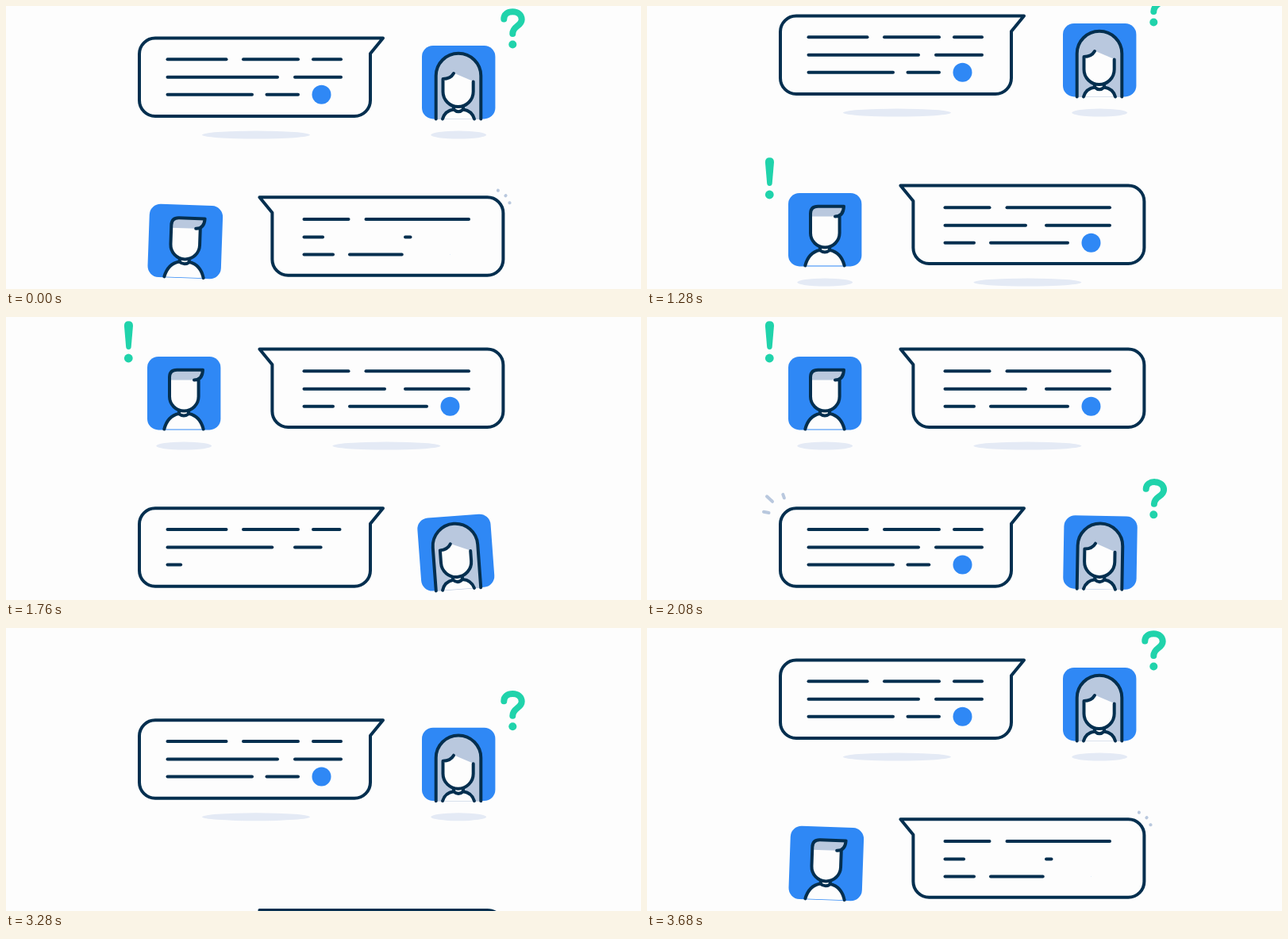
These frames come from a looping animation (800x357 px, 3.72 s). An HTML page with a canvas:

```html
<!DOCTYPE html>
<html lang="en">
<head>
<meta charset="utf-8">
<title>Question and answer</title>
<style>
  html, body { margin: 0; width: 100%; height: 100%; overflow: hidden; background: #fdfdfd; }
  canvas { display: block; }
</style>
</head>
<body>
<canvas id="stage" width="800" height="357"></canvas>
<script>
const ctx = document.getElementById('stage').getContext('2d');
const NAVY = '#042f4f', BLUE = '#2f88f5', GREEN = '#20d3ab', GREY = '#b9c8de', PALE = '#e4eaf5', WHITE = '#fdfdfd';
const LOOP = 3720, CYCLE = 3680, FRAME = 40, ENTER = -130;

const clamp = v => Math.max(0, Math.min(1, v));
const smooth = v => { v = clamp(v); return v * v * (3 - 2 * v); };

// Monotone cubic curve through [time, value] points.
function track(points, t) {
  const last = points.length - 1;
  if (t <= points[0][0]) return points[0][1];
  if (t >= points[last][0]) return points[last][1];
  const slope = i => (points[i + 1][1] - points[i][1]) / (points[i + 1][0] - points[i][0]);
  const tangent = i => {
    if (i === 0 || i === last) return slope(Math.min(i, last - 1));
    const a = slope(i - 1), b = slope(i);
    return a * b > 0 ? 2 * a * b / (a + b) : 0;
  };
  let i = 0;
  while (points[i + 1][0] < t) i++;
  const h = points[i + 1][0] - points[i][0], u = (t - points[i][0]) / h, s = smooth(u);
  return points[i][1] * (1 - s) + points[i + 1][1] * s
    + h * u * (1 - u) * (tangent(i) * (1 - u) - tangent(i + 1) * u);
}

// Motion of a speech group, in ms since its arrival in the lower row.
const HEIGHT = [[ENTER, 331], [-80, 255], [-40, 212], [0, 201.6], [50, 199.6], [160, 200.8],
  [1480, 200.8], [1560, 186], [1720, 75.7], [1840, -2], [1890, -3.5], [2000, 0],
  [3320, 0], [3400, -28], [3550, -225]];
const LEAN = [[ENTER, 0], [0, -4], [100, -6], [280, -2], [440, 1.4], [520, 1], [660, 0]];
const POP = [[300, 0], [440, 1.06], [520, 1]];
const WAG = [[300, -20], [450, 5], [520, 2.5], [680, -2], [830, 1], [980, 0]];

const BUBBLE = new Path2D('M188 40.5H475L459 60V119a20 20 0 0 1-20 20H188a20 20 0 0 1-20-20V60.5a20 20 0 0 1 20-20z');
const RAYS = [[174.5, 32, 171.3, 23], [165, 38.5, 151, 25.5], [160, 47.5, 147, 45]];

function fill(path, color) { ctx.fillStyle = color; ctx.fill(new Path2D(path)); }
function stroke(path, color = NAVY, width = 4) {
  ctx.strokeStyle = color;
  ctx.lineWidth = width;
  ctx.stroke(new Path2D(path));
}
function ellipse(x, y, rx, ry, color) {
  ctx.fillStyle = color;
  ctx.beginPath();
  ctx.ellipse(x, y, rx, ry, 0, 0, 7);
  ctx.fill();
}
function line(x1, y1, x2, y2, color) { stroke(`M${x1} ${y1}L${x2} ${y2}`, color); }

function within(draw) { ctx.save(); draw(); ctx.restore(); }
function pivot(x, y, degrees, scale = 1) {
  ctx.translate(x, y);
  ctx.rotate(degrees * Math.PI / 180);
  ctx.scale(scale, scale);
  ctx.translate(-x, -y);
}

function woman() {
  fill('M541.7 143V88a28.3 28.3 0 0 1 56.6 0V143z', GREY);
  const body = 'M550 142.5C552 135.5 557 131.5 564 130.5Q570 136 576 130.5C583 131.5 588 135.5 590 142.5';
  fill(body, WHITE);
  fill('M564 124V130Q570 136 576 130V124z', WHITE);
  fill('M550.5 92V108a19.1 19.1 0 0 0 38.2 0V95L564 84.5Q559 92 550.5 92z', WHITE);
  stroke('M541.7 142.5V88a28.3 28.3 0 0 1 56.6 0V142.5');
  stroke(body);
  stroke('M564 127V130.5M576 127V130.5');
  stroke('M564 85Q560 92 550.5 92V108a19.1 19.1 0 0 0 38.2 0V95.5');
}

function man() {
  const body = 'M199.3 141.5C202 131 208 124 217.5 122Q224 127 230.5 122C240 124 246 131 248.7 141.5';
  fill(body, WHITE);
  fill('M218 116V122Q224 127 230 122V116z', WHITE);
  fill('M206 78V100.3a18.3 18.3 0 0 0 36.6 0V78z', WHITE);
  fill('M206 79.5V76Q206 66.7 215.5 66.7H248Q247.500 79.500 237 79.500z', GREY);
  stroke(body);
  stroke('M218 118.5V122M230 118.5V122');
  stroke('M237 79.500Q247.500 79.500 248 66.7H215.5Q206 66.7 206 76V100.3a18.3 18.3 0 0 0 36.6 0V79');
}

function questionMark() {
  stroke('M627.3 16.500C627.300 10.500 632 7.300 638.300 7.300C645 7.300 649.700 11.300 649.700 17C649.700 25.500 638.300 25 638.300 35', GREEN, 8);
  ellipse(638.3, 48.5, 5, 5, GREEN);
}

function exclamationMark() {
  fill('M148.9 11Q148.900 5.300 154.400 5.300Q160 5.300 160 11L157.700 38Q157.300 41 154.400 41Q151.600 41 151.200 38z', GREEN);
  ellipse(154.3, 52, 5.4, 5.4, GREEN);
}

// Text strokes: [x1, x2, row, start time].
const ROWS = [67.2, 89.7, 111.7];
const groups = [
  {
    arrival: 1560, side: 1, textShift: 0, person: woman, mark: questionMark, markAt: [638.3, 48.5],
    text: [[203.5, 277.5, 0, -102], [299, 368, 0, -58], [387, 422, 0, -10], [203.5, 342, 1, -8],
      [364, 422, 1, 70], [203.5, 310, 2, 140], [328.5, 368, 2, 371]],
    dot: [397.5, 270]
  },
  {
    arrival: 3400, side: -1, textShift: 1, person: man, mark: exclamationMark, markAt: [154.3, 52],
    text: [[375.5, 431.5, 0, -102], [453.5, 583, 0, -58], [375.5, 477, 1, 205], [503, 583, 1, 238],
      [375.5, 412, 2, 0], [433, 530, 2, 131]],
    dot: [559.5, 265]
  }
];

function drawGroup(g, time) {
  const c = (time - g.arrival - ENTER + 2 * CYCLE) % CYCLE + ENTER;
  const lean = track(LEAN, c) * g.side;
  const centre = g.side > 0 ? 570.2 : 224.2;
  ctx.translate(0, track(HEIGHT, c));

  within(() => {
    if (g.side < 0) { ctx.translate(794.4, 0); ctx.scale(-1, 1); }
    ellipse(315, 162.6, 68, 5, PALE);
    ellipse(570.2, 162.6, 35, 5, PALE);
    ctx.strokeStyle = NAVY;
    ctx.lineWidth = 4;
    ctx.stroke(BUBBLE);
    const head = smooth((c - 265) / 210), tail = smooth((c - 400) / 240);
    if (head > 0 && tail < 1) {
      for (const [x, y, dx, dy] of RAYS.map(r => [r[0], r[1], r[2] - r[0], r[3] - r[1]])) {
        line(x + dx * tail, y + dy * tail, x + dx * head, y + dy * head, GREY);
      }
    }
  });

  for (const [x1, x2, row, start] of g.text) {
    const grown = smooth((c - start) / 240), y = ROWS[row] + g.textShift;
    if (grown > 0) line(x1, y, x1 + (x2 - x1) * grown, y, NAVY);
  }
  const radius = 12 * smooth((c - g.dot[1]) / 200);
  ellipse(g.dot[0], ROWS[2] + g.textShift, radius, radius, BLUE);

  within(() => {
    pivot(centre, 142.3, lean);
    ctx.fillStyle = BLUE;
    ctx.beginPath();
    ctx.roundRect(centre - 46.2, 50, 92.4, 92.4, 14);
    ctx.fill();
    g.person();
  });

  const pop = track(POP, c);
  if (pop > 0) within(() => {
    pivot(...g.markAt, track(WAG, c) * g.side, pop);
    g.mark();
  });
}

function render(now) {
  const time = Math.floor(now % LOOP / FRAME) * FRAME;
  ctx.fillStyle = WHITE;
  ctx.fillRect(0, 0, 800, 357);
  ctx.lineCap = ctx.lineJoin = 'round';
  for (const g of groups) within(() => drawGroup(g, time));
}

const begin = performance.now();
(function tick() {
  render(performance.now() - begin);
  requestAnimationFrame(tick);
})();
</script>
</body>
</html>
```
